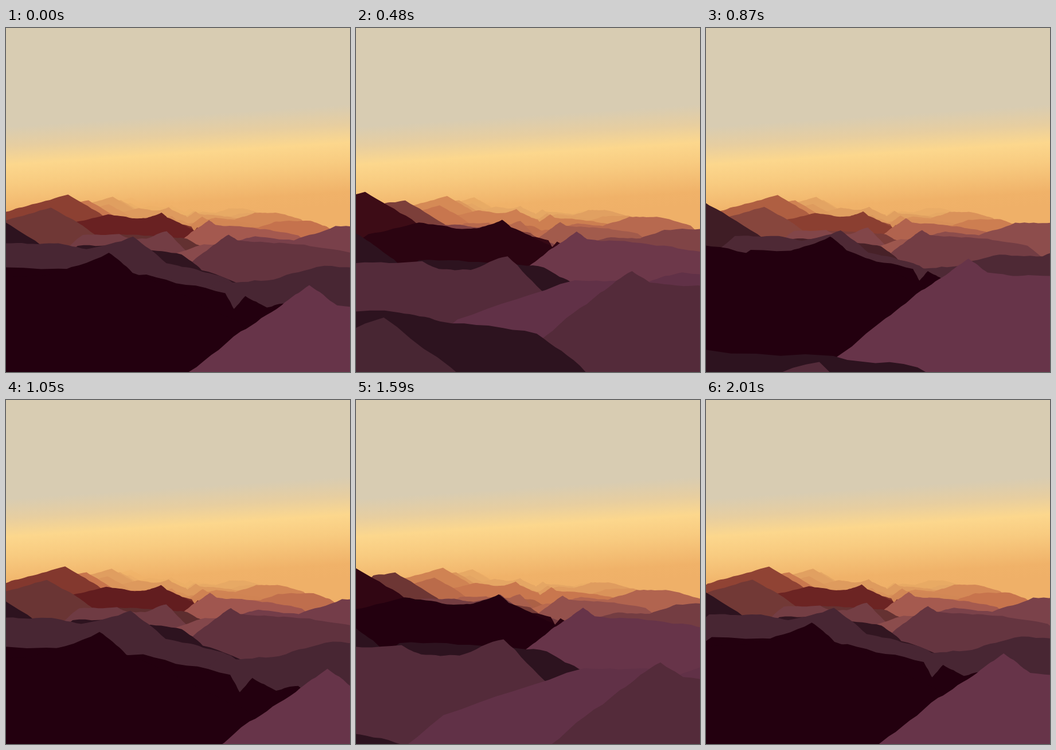
Animation, 600 px wide and 600 px high, one loop 2.04 s. Source, as an HTML page:

```html
<!DOCTYPE html>
<html lang="en">
<head>
<meta charset="utf-8">
<title>Flight over mountains</title>
<style>
  html, body { margin: 0; width: 100%; height: 100%; overflow: hidden; background: #d8ccb2; }
  svg { display: block; width: 100%; height: 100%; }
</style>
</head>
<body>
<svg id="stage" viewBox="0 0 600 600" preserveAspectRatio="xMidYMid slice">
  <defs>
    <linearGradient id="sky" gradientUnits="userSpaceOnUse" x1="300" y1="0" x2="326" y2="400">
      <stop offset=".38" stop-color="#d8ccb2"/>
      <stop offset=".465" stop-color="#e7cea0"/>
      <stop offset=".545" stop-color="#fcd78d"/>
      <stop offset=".63" stop-color="#f8cb80"/>
      <stop offset=".76" stop-color="#f0b269"/>
      <stop offset=".82" stop-color="#efb068"/>
    </linearGradient>
  </defs>
  <rect width="600" height="600" fill="url(#sky)"/>
  <g id="land"></g>
</svg>
<script>
const LOOP = 2040, STEP = 30, PERIOD = 1012, COPIES = 4;
const SVG_NS = 'http://www.w3.org/2000/svg';
const land = document.getElementById('land');

const rgb = hex => [0, 2, 4].map(i => parseInt(hex.slice(i, i + 2), 16));
const haze = [[1.7, 'c7744d'], [2.1, 'da935a'], [2.6, 'e3a463'], [3.4, 'eeb168']]
  .map(([z, hex]) => [z, rgb(hex)]);
const tone = (near, mid) => [[.78, rgb(near)], [1.3, rgb(mid)], ...haze];

const night = tone('23000f', '651e20');
const shadow = tone('2d131f', '80413b');
const umber = tone('482633', '8c4a4a');
const dusk = tone('542b3a', '8c4c4c');
const rose = tone('613147', 'ab6050');
const plum = tone('673449', 'a3584f');

// Depth, tone and the main turns of each skyline, relative to the vanishing point.
const ridges = [
  [.06, rose, '-72,122 48,82 107,83'],
  [.065, dusk, '-177,65 -109,63 -92,71 -59,72 -21,58 19,97'],
  [.12, shadow, '-123,68 -33,70 18,76 53,95'],
  [.2, shadow, '-360,43 -266,16 -204,51 -170,75'],
  [.31, plum, '2,96 34,71 56,57 71,46 86,57 118,59 210,68 275,81'],
  [.315, night, '-234,50 -160,33 -105,42 -71,41 -38,29 -25,40 32,66'],
  [.4, night, '-120,47 -22,52 33,65 39,76 47,67 62,75 76,72'],
  [.46, night, '-438,30 -372,11 -280,-14 -200,33'],
  [.685, umber, '45,98 107,96 166,80 237,81 288,63 389,61 437,78'],
  [.689, umber, '-207,52 -155,52 -110,59 -54,44 -14,76 24,84 60,95'],
  [.75, shadow, '-318,7 -273,1 -187,53'],
  [.8, shadow, '-140,64 -73,64 -50,69 5,76 33,98 112,124'],
  [.926, dusk, '14,107 57,73 82,56 96,65 139,68 204,72 278,85'],
  [.95, rose, '100,68 128,60 192,67 261,43 331,43 419,66']
];

const mix = (a, b, k) => a + (b - a) * k;

function shade(stops, z) {
  const i = stops.findIndex(([depth]) => z < depth);
  if (i === 0) return `rgb(${stops[0][1]})`;
  if (i < 0) return `rgb(${stops[stops.length - 1][1]})`;
  const [z0, a] = stops[i - 1], [z1, b] = stops[i];
  return `rgb(${a.map((v, j) => Math.round(mix(v, b[j], (z - z0) / (z1 - z0))))})`;
}

function noise(seed) {
  const v = Math.sin(seed * 12.9898) * 43758.5453;
  return (v - Math.floor(v)) * 2 - 1;
}

// Midpoint displacement: returns the rough line from a up to, not including, b.
function roughen(a, b, level = 3) {
  if (!level) return [a];
  const length = Math.hypot(b[0] - a[0], b[1] - a[1]);
  const bump = Math.min(1.4, length * .05) * noise(a[0] + a[1] * 3 + b[0]);
  const middle = [(a[0] + b[0]) / 2, (a[1] + b[1]) / 2 + bump];
  return [...roughen(a, middle, level - 1), ...roughen(middle, b, level - 1)];
}

function outline(skyline) {
  const turns = skyline.split(' ').map(p => p.split(',').map(Number));
  const first = turns[0], last = turns[turns.length - 1];
  // Both flanks fall away at the same slope.
  const pts = [[first[0] - 90, first[1] + 74], ...turns, [last[0] + 90, last[1] + 74]];
  const end = pts[pts.length - 1];
  const line = pts.slice(1).flatMap((p, i) => roughen(pts[i], p));
  line.push(end, [end[0], 1600], [pts[0][0], 1600]);
  return 'M' + line.map(p => p.map(v => v.toFixed(2)).join(' ')).join('L') + 'Z';
}

// The same terrain repeats at every whole unit of depth.
const layers = ridges.flatMap(([depth, stops, skyline]) => {
  const d = outline(skyline);
  return Array.from({ length: COPIES }, (_, i) => ({ depth: depth + i, d, stops }));
}).sort((a, b) => b.depth - a.depth);

for (const layer of layers) {
  layer.path = document.createElementNS(SVG_NS, 'path');
  layer.path.setAttribute('d', layer.d);
  land.append(layer.path);
}

function draw(time) {
  const held = Math.floor((time % LOOP) / STEP) * STEP;
  const travel = held / PERIOD % 1;
  for (const { depth, stops, path } of layers) {
    const z = depth - travel;
    const visible = z > .03 && z < 3.8;
    path.setAttribute('display', visible ? 'inline' : 'none');
    if (!visible) continue;
    path.setAttribute('transform', `translate(300 300) scale(${1 / z})`);
    path.setAttribute('fill', shade(stops, z));
    path.setAttribute('opacity', Math.min(1, (3.8 - z) / .9));
  }
}

let start;
function tick(now) {
  start ??= now;
  draw(now - start);
  requestAnimationFrame(tick);
}
draw(0);
requestAnimationFrame(tick);
</script>
</body>
</html>
```
